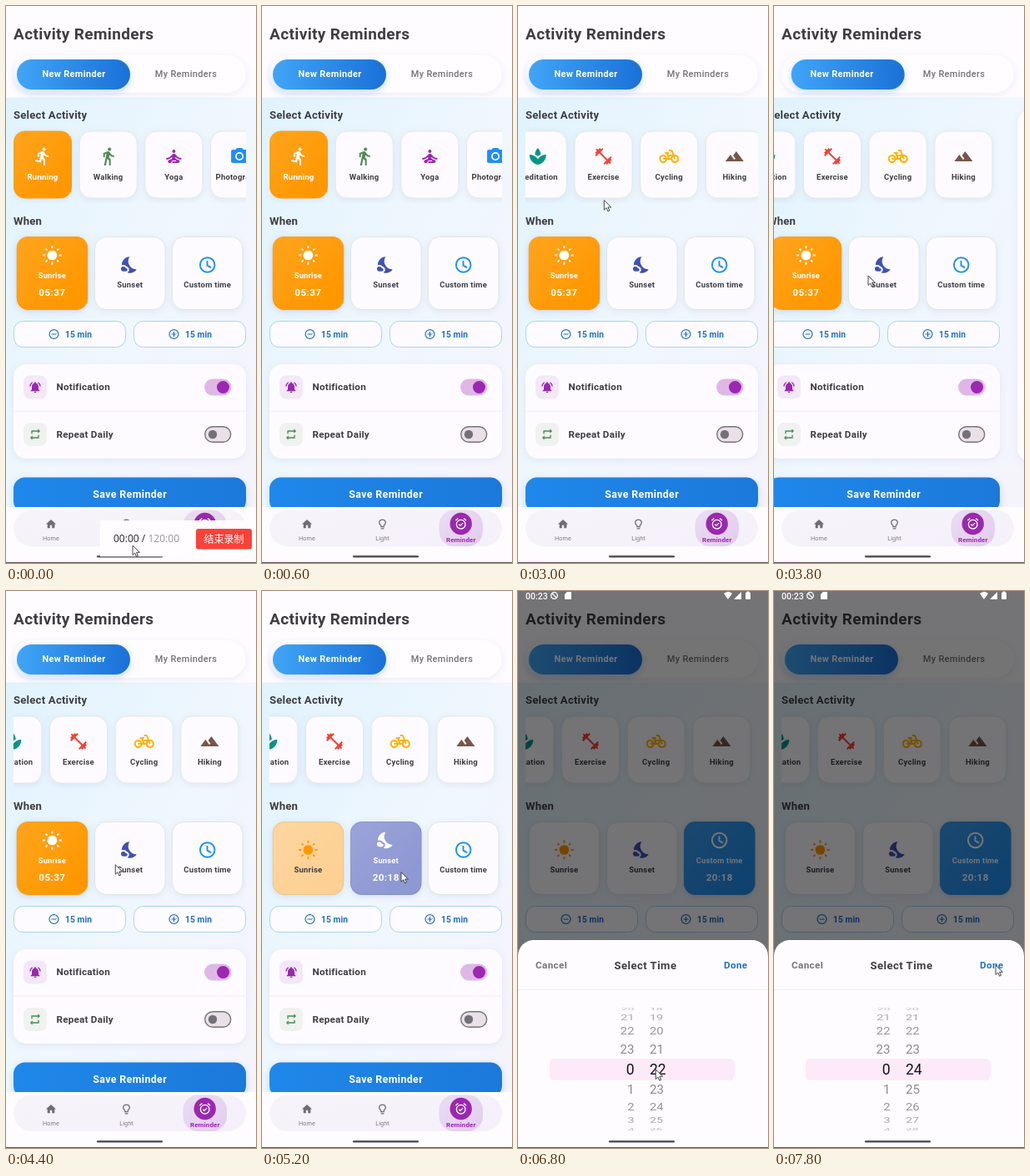
An HTML page for the animation above (8000 ms loop, 300 by 667 pixels).

```html
<!DOCTYPE html>
<html lang="en">
<head>
<meta charset="utf-8">
<title>Activity Reminders</title>
<style>
html, body { margin: 0; width: 100%; height: 100%; overflow: hidden; background: #fefcff; }
svg { display: block; width: 100vw; height: 100vh; font-family: Roboto, sans-serif; }
.soft { filter: drop-shadow(0 2px 4px rgba(90, 100, 160, .1)); }
.blue { filter: drop-shadow(0 3px 4px rgba(33, 120, 230, .25)); }
</style>
</head>
<body>
<svg viewBox="0 0 300 667">
  <defs>
    <linearGradient id="page" x2="1" y2=".9"><stop stop-color="#e0f3fe"/><stop offset=".5" stop-color="#eff7fe"/><stop offset="1" stop-color="#f5f4fd"/></linearGradient>
    <linearGradient id="tab"><stop stop-color="#40a5f6"/><stop offset="1" stop-color="#1a71d8"/></linearGradient>
    <linearGradient id="save"><stop stop-color="#1f88ea"/><stop offset="1" stop-color="#1b79da"/></linearGradient>
    <linearGradient id="nav" x2="1" y2="1"><stop stop-color="#f6f4fa"/><stop offset="1" stop-color="#f5f0fa"/></linearGradient>
    <linearGradient id="chosen" x2="1" y2="1"><stop stop-color="#eadcf3"/><stop offset="1" stop-color="#e2cdec"/></linearGradient>
    <linearGradient id="sheen" x2="1" y2="1"><stop stop-color="#fff" stop-opacity=".12"/><stop offset=".8" stop-color="#fff" stop-opacity="0"/></linearGradient>
    <clipPath id="list"><rect x="9" y="144" width="279" height="92"/></clipPath>
    <clipPath id="body"><rect y="109" width="300" height="491"/></clipPath>
  </defs>
  <g id="scene"></g>
</svg>
<script>
const LOOP = 8000, STEP = 200;
const INK = '#3f3d43', CARD = '#fdfbff', PURPLE = '#9c27b0', BLUE = '#1f6fca';

// Icon outlines on a 24 unit grid
const ICONS = {
  run: 'M13.5 5.5a2 2 0 1 0 0-4 2 2 0 0 0 0 4zM9.9 19.4l1-4.4 2.1 2v6h2v-7.5l-2.1-2 .6-3c1.3 1.5 3.3 2.5 5.5 2.5v-2c-1.9 0-3.5-1-4.3-2.4l-1-1.6c-.4-.6-1-1-1.7-1-.3 0-.5.1-.8.1L6 8.3V13h2V9.6l1.8-.7L8.2 17l-4.9-1-.4 2z',
  walk: 'M13.5 5.5a2 2 0 1 0 0-4 2 2 0 0 0 0 4zM9.8 8.9L7 23h2.1l1.8-8 2.1 2v6h2v-7.5l-2.1-2 .6-3C14.8 12 16.8 13 19 13v-2c-1.9 0-3.5-1-4.3-2.4l-1-1.6c-.4-.6-1-1-1.7-1-.3 0-.5.1-.8.1L6 8.3V13h2V9.6z',
  yoga: 'M12 8a2 2 0 1 0 0-4 2 2 0 0 0 0 4zM21 16v-2c-2.2 0-4.2-1-5.6-2.7l-1.3-1.6c-.4-.4-1-.7-1.6-.7h-1c-.6 0-1.2.3-1.5.7l-1.4 1.6C7.2 13 5.2 14 3 14v2c2.8 0 5.2-1.2 7-3.2V15l-3.9 1.5c-.6.3-1.1 1-1.1 1.7 0 1 .8 1.8 1.8 1.8H9v-.5c0-1.4 1.1-2.5 2.5-2.5h3c.7 0 .7 1 0 1h-3c-.8 0-1.5.7-1.5 1.5v.5h7.1c.9 0 1.7-.5 1.9-1.4.2-.9-.3-1.7-1.1-2L14 15v-2.2c1.8 2 4.2 3.2 7 3.2z',
  camera: 'M9 2L7.2 4H4a2 2 0 0 0-2 2v12a2 2 0 0 0 2 2h16a2 2 0 0 0 2-2V6a2 2 0 0 0-2-2h-3.2L15 2zM12 17a5 5 0 1 1 0-10 5 5 0 0 1 0 10zM12 15.2a3.2 3.2 0 1 0 0-6.4 3.2 3.2 0 0 0 0 6.4z',
  leaf: 'M15.5 9.6C15.3 6.8 14.2 4.1 12 2 9.9 4.1 8.7 6.8 8.5 9.6c1.3.7 2.5 1.6 3.5 2.7 1-1.1 2.2-2 3.5-2.7zM12 15.5C9.9 12.2 6.2 10 2 10c0 6 4 11 10 12 6-1 10-6 10-12-4.2 0-7.9 2.2-10 5.5z',
  dumbbell: 'M20.6 14.9l1.4-1.5-1.4-1.4-3.6 3.6L8.4 7 12 3.4 10.6 2 9.1 3.4 7.7 2 5.6 4.1 4.1 2.7 2.7 4.1l1.4 1.5L2 7.7l1.4 1.4L2 10.6 3.4 12 7 8.4l8.6 8.6-3.6 3.6 1.4 1.4 1.5-1.4 1.4 1.4 2.1-2.1 1.5 1.4 1.4-1.4-1.4-1.5 2.1-2.1z',
  bike: 'M18.2 10l-1.7-4.7A2 2 0 0 0 14.6 4H12v2h2.6l1.5 4h-4.8l-.4-1H12V7H7v2h1.7l1.9 5h-.7A5 5 0 1 0 9.9 16h4.2A5 5 0 1 0 19 10zM7.8 16A3 3 0 1 1 7.8 14H5v2zM14.1 14h-1.4l-.7-2h3q-.7.9-.9 2zM19 18a3 3 0 0 1-1.9-5.3l.9 2.7 1.9-.7-.9-2.7a3 3 0 0 1 0 6z',
  hills: 'M14 6l-3.75 5 2.85 3.8-1.6 1.2L7 10l-6 8h22z',
  moon: 'M11.1 12.1c-2.3-4.5-.5-8.5.5-10.1C6.3 2.2 2 6.6 2 12v.4c.6-.3 1.3-.4 2-.4 1.7 0 3.2.8 4.1 2.1 1.7.5 2.9 2.1 2.9 3.9 0 1.5-.9 2.8-2.1 3.5 4.4 1.4 9 0 11.5-4-2.4.2-7-1-9.3-5.4zM7 16h-.2A3 3 0 1 0 4 20h3a2 2 0 0 0 0-4z',
  bell: 'M7.6 4.1L6.2 2.6A10.5 10.5 0 0 0 2 10.5h2c.2-2.7 1.6-5 3.6-6.4zM20 10.5h2a10.5 10.5 0 0 0-4.1-7.9l-1.5 1.5c2.1 1.4 3.4 3.7 3.6 6.4zM18 11c0-3.1-1.6-5.6-4.5-6.3V4a1.5 1.5 0 0 0-3 0v.7C7.6 5.4 6 7.9 6 11v5l-2 2v1h16v-1l-2-2zM12 22a2 2 0 0 0 2-2h-4a2 2 0 0 0 2 2z',
  repeat: 'M7 7h10v3l4-4-4-4v3H5v6h2zM17 17H7v-3l-4 4 4 4v-3h12v-6h-2z',
  home: 'M10 20v-6h4v6h5v-8h3L12 3 2 12h3v8z',
  pointer: 'M0 0v11.5l2.7-2.5 1.8 4.2 1.9-.8-1.8-4.1h3.8z'
};
const LINE_ICONS = {
  clock: 'M12 3a9 9 0 1 0 0 18 9 9 0 0 0 0-18zM11.8 7v5.7l4.7 2.8',
  minus: 'M12 3a9 9 0 1 0 0 18 9 9 0 0 0 0-18zM7 12h10',
  plus: 'M12 3a9 9 0 1 0 0 18 9 9 0 0 0 0-18zM7 12h10M12 7v10',
  bulb: 'M9 21h6M9 17v-3C3 10 6 3 12 3s9 7 3 11v3z',
  alarm: 'M12 5a8 8 0 1 0 0 16 8 8 0 0 0 0-16zM2.5 6L7 2.3M21.5 6L17 2.3M8.5 13l2.5 2.5 4.8-4.8',
  sun: 'M12 .5v3M12 20.5v3M.5 12h3M20.5 12h3M4 4l2 2M18 18l2 2M4 20l2-2M18 6l2-2'
};

const ACTIVITIES = [
  ['Running', 'run', '#ff9800'], ['Walking', 'walk', '#4f8a5b'], ['Yoga', 'yoga', PURPLE],
  ['Photography', 'camera', '#2190f0'], ['Meditation', 'leaf', '#009688'], ['Exercise', 'dumbbell', '#f44336'],
  ['Cycling', 'bike', '#ffb300'], ['Hiking', 'hills', '#795548']
];

// Linear interpolation through [time, value] stops
function track(t, stops) {
  const next = stops.findIndex(s => s[0] > t);
  if (next === 0) return stops[0][1];
  if (next < 0) return stops[stops.length - 1][1];
  const [t0, a] = stops[next - 1], [t1, b] = stops[next];
  return a + (b - a) * (t - t0) / (t1 - t0);
}

const rect = (x, y, w, h, r, fill, extra = '') =>
  `<rect x="${x}" y="${y}" width="${w}" height="${h}" rx="${r}" fill="${fill}" ${extra}/>`;
const circle = (x, y, r, fill, extra = '') => `<circle cx="${x}" cy="${y}" r="${r}" fill="${fill}" ${extra}/>`;
const text = (x, y, str, size, fill, { weight = 700, anchor = 'start', gap = .22, extra = '' } = {}) =>
  `<text x="${x}" y="${y}" font-size="${size}" font-weight="${weight}" fill="${fill}" text-anchor="${anchor}" letter-spacing="${gap}" ${extra}>${str}</text>`;
const centered = (x, y, str, size, fill, gap, weight) => text(x, y, str, size, fill, { anchor: 'middle', gap, weight });
const group = (x, y, content, extra = '') => `<g transform="translate(${x} ${y})" ${extra}>${content}</g>`;

function icon(name, x, y, size, color) {
  const k = size / 24;
  const solid = ICONS[name] ? `<path d="${ICONS[name]}" fill="${color}" fill-rule="evenodd"/>` : '';
  const lines = LINE_ICONS[name] ? `<path d="${LINE_ICONS[name]}" fill="none" stroke="${color}" stroke-width="2"/>` : '';
  const disc = name === 'sun' ? circle(12, 12, 6, color) : '';
  return `<g transform="translate(${x - size / 2} ${y - size / 2}) scale(${k})">${solid}${lines}${disc}</g>`;
}

// A filled card, slightly lighter towards its top left corner
const filledCard = (x, y, w, h, color, opacity = 1) =>
  `<g opacity="${opacity}">${rect(x, y, w, h, 14, color, 'class="soft"')}${rect(x, y, w, h, 14, 'url(#sheen)')}</g>`;

function header(swipe) {
  return rect(0, 0, 300, 109.5, 0, '#fefcff')
    + text(9, 40, 'Activity Reminders', 19, INK, { gap: .37 })
    + rect(9, 59, 279, 45, 22.5, '#fffdff', 'class="soft"')
    + rect(13 + swipe * .45, 64, 136, 36, 18, 'url(#tab)', 'class="blue"')
    + centered(81.5, 85, 'New Reminder', 10.95, '#fff', .36)
    + centered(216, 85, 'My Reminders', 10.95, '#747078', .36, 500);
}

function activityCard([name, glyph, color], index) {
  const selected = index === 0, x = 9 + index * 78.7;
  return (selected
    ? filledCard(x, 149.5, 70, 81, color)
    : rect(x + .5, 150, 69, 80, 14, CARD, 'stroke="#e2eae6" class="soft"'))
    + icon(glyph, x + 35, 180, 24, selected ? '#fff' : color)
    + centered(x + 35, 208, name, 9.5, selected ? '#fff' : INK);
}

// glow is the strength of the fill, selected switches the layout
function timeCard(x, name, glyph, color, time, selected, glow) {
  const mid = x + 42.7;
  return rect(x + .5, 276.5, 84.5, 87, 14, CARD, 'stroke="#dde8e3" class="soft"')
    + (glow ? filledCard(x, 276, 85.5, 88, color, glow) : '')
    + icon(glyph, mid, selected ? 298.5 : 310, 23.4, selected ? '#fff' : color)
    + (selected
      ? centered(mid, 325.5, name, 9.3, '#fff') + centered(mid, 347, time, 11.7, '#fff', .4)
      : centered(mid, 337, name, 9.5, INK));
}

function stepButton(x, glyph) {
  return rect(x + .5, 377.5, 134, 31, 11, CARD, 'stroke="#a9d2f3"')
    + icon(glyph, x + 48.5, 393, 14.6, BLUE)
    + text(x + 62, 397, '15 min', 10.2, BLUE, { weight: 600, gap: .1 });
}

function optionRow(y, name, glyph, color, tint, on) {
  return rect(21, y - 14, 28, 28, 8, tint) + icon(glyph, 35, y, 16, color)
    + text(60.5, y + 3.5, name, 11.7, INK)
    + (on
      ? rect(238, y - 10, 32.5, 20, 10, '#dfb7e7') + circle(260.5, y, 7.5, PURPLE)
      : rect(238.7, y - 9.3, 31, 18.6, 9.3, '#e9e0ea', 'stroke="#7b737d" stroke-width="1.4"') + circle(248, y, 5.2, '#74707a'));
}

function page(t, swipe) {
  const scroll = track(t, [[1800, 0], [2000, 44.5], [2200, 130], [2400, 205], [2600, 255], [2800, 300], [3000, 335], [3200, 350.5]]);
  const toSunset = track(t, [[5000, 0], [5200, .58], [5400, 1]]);
  const toCustom = track(t, [[5600, 0], [6000, 1]]);
  const content = text(9, 135, 'Select Activity', 13.14, INK)
    + `<g clip-path="url(#list)">${group(-scroll, 0, ACTIVITIES.map(activityCard).join(''))}</g>`
    + text(9, 262, 'When', 13.14, INK)
    + timeCard(12.7, 'Sunrise', 'sun', '#ff9800', '05:37', !toSunset, 1 - toSunset)
    + timeCard(106, 'Sunset', 'moon', '#3f51b5', '20:18', toSunset && !toCustom, toSunset * (1 - toCustom))
    + timeCard(199, 'Custom time', 'clock', '#2190f0', '20:18', toCustom, toCustom)
    + stepButton(9, 'minus') + stepButton(153, 'plus')
    + rect(9, 429, 279, 113, 15, CARD, 'class="soft"')
    + rect(9, 484.7, 279, .8, 0, '#f3e9ee')
    + optionRow(456.5, 'Notification', 'bell', PURPLE, '#f3e8f6', true)
    + optionRow(513, 'Repeat Daily', 'repeat', '#4b8a55', '#eff2ef', false)
    + rect(9, 564.5, 279, 42, 14, 'url(#save)', 'class="blue"')
    + centered(148.7, 589, 'Save Reminder', 12.4, '#fff', .37)
    + rect(309, 125, 279, 420, 15, CARD, 'class="soft"');
  return rect(0, 109, 300, 492, 0, 'url(#page)') + `<g clip-path="url(#body)">${group(-swipe, 0, content)}</g>`;
}

function bottomBar() {
  return rect(0, 600, 300, 67, 0, '#fefcff')
    + rect(9, 603.5, 279, 43.5, 22, 'url(#nav)')
    + icon('home', 54, 620.5, 14.6, '#706d74') + centered(54, 640, 'Home', 7.3, '#807d84', .05, 400)
    + icon('bulb', 144.5, 620.5, 14.6, '#706d74') + centered(144.5, 640, 'Light', 7.3, '#807d84', .05, 400)
    + rect(212.5, 603.5, 52.5, 43.5, 18, 'url(#chosen)')
    + circle(238.7, 620, 13.2, PURPLE) + icon('alarm', 238.7, 620, 16, '#fff')
    + centered(238.7, 642, 'Reminder', 8, PURPLE, .1);
}

function statusBar() {
  return text(9, 9.5, '00:23', 10.5, '#fff', { weight: 500, gap: 0 })
    + circle(43.5, 5.5, 3.8, 'none', 'stroke="#fff" stroke-width="1.3"')
    + `<path d="M41 3l5 5" stroke="#fff" stroke-width="1.3"/>
       <path d="M56 4l3-3h5v9h-8zM247 3q5-4 10 0l-5 7zM268 1v9h-9z" fill="#fff"/>`
    + rect(273, 1.5, 6, 8.5, 1, '#fff') + rect(274.8, .5, 2.4, 2, 0, '#fff');
}

// A wheel of numbers wrapped round a cylinder
function wheel(x, anchor, value, count) {
  let out = '';
  const middle = Math.round(value);
  for (let n = middle - 4; n <= middle + 4; n++) {
    const angle = (n - value) * .33, chosen = n === middle;
    const size = chosen ? 17.5 : 15.2;
    const shrink = 1 - .12 * (1 - Math.cos(angle));
    out += `<g transform="translate(${x} ${572.5 + 74 * Math.sin(angle)}) scale(${shrink} ${Math.max(.1, Math.cos(angle))})">`
      + text(0, size * .355, (n + count) % count, size, chosen ? '#151418' : '#8b868c',
        { weight: 400, anchor, gap: 0, extra: `opacity="${chosen ? 1 : .4 + .6 * Math.cos(angle)}"` })
      + '</g>';
  }
  return out;
}

function timeSheet(t) {
  const open = track(t, [[5800, 0], [6000, .7], [6200, 1]]);
  if (!open) return '';
  const minute = track(t, [[6800, 22], [7000, 22.6], [7200, 23.6], [7400, 24]]);
  const sheet = `<path d="M0 667V437a19 19 0 0 1 19-19H281a19 19 0 0 1 19 19V667z" fill="#fefcff"/>`
    + text(21, 452, 'Cancel', 11.7, '#77737a', { weight: 600, gap: .36 })
    + centered(153, 452.5, 'Select Time', 13.14, INK, .45)
    + text(247, 452, 'Done', 11.7, '#1b72cc', { gap: .36 })
    + rect(0, 477, 300, .8, 0, '#efebef')
    + rect(38, 560, 222, 26, 5, '#fdeaf8')
    + wheel(139.5, 'end', 0, 24) + wheel(158, 'start', minute, 60);
  return rect(0, 0, 300, 667, 0, '#000', `opacity="${.54 * open}"`) + statusBar() + group(0, 249 * (1 - open), sheet);
}

function recorder() {
  return rect(113, 616, 187, 43.2, 0, '#fffdff')
    + `<g font-family="'Open Sans', sans-serif">`
    + text(129, 642, '00:00 /', 12, '#252428', { weight: 400, gap: 0 })
    + text(170.5, 642, '120:00', 12, '#99959a', { weight: 400, gap: 0 }) + '</g>'
    + rect(228, 626, 67, 24.5, 3, '#fa4238')
    + `<g font-family="'Noto Sans CJK SC', 'Noto Sans CJK', sans-serif">${centered(261.5, 642.5, '结束录制', 12, '#fff', 0, 400)}</g>`;
}

function cursor(t) {
  if (t >= 400 && t < 1600) return '';
  const x = track(t, [[400, 152], [1600, 172], [1800, 170], [2000, 128], [2200, 80], [2400, 150], [2800, 90], [3400, 130], [3800, 113], [4200, 120], [5000, 165], [5200, 167], [5600, 238], [6000, 236], [6600, 165], [7400, 166], [7800, 266]]);
  const y = track(t, [[400, 646], [1600, 185], [2800, 188], [3400, 322], [4200, 324], [5000, 339], [5600, 332], [6000, 340], [6600, 573], [6800, 573], [7400, 530], [7800, 448]]);
  return group(x, y, `<path d="${ICONS.pointer}" fill="#fff" stroke="#333" stroke-width=".9"/>`);
}

function scene(t) {
  const swipe = track(t, [[3400, 0], [3600, 8], [3800, 17], [4000, 5], [4200, 0]]);
  return page(t, swipe) + header(swipe) + bottomBar()
    + timeSheet(t)
    + rect(109, 658, 79, 2.6, 1.3, '#57545a')
    + (t < 400 ? recorder() : '')
    + rect(0, 666, 300, 1, 0, '#6a4c50')
    + cursor(t);
}

const stage = document.getElementById('scene');
let shown = -1;
function tick(now) {
  const t = Math.floor(now % LOOP / STEP) * STEP;
  if (t !== shown) stage.innerHTML = scene(shown = t);
  requestAnimationFrame(tick);
}
tick(performance.now());
</script>
</body>
</html>
```
